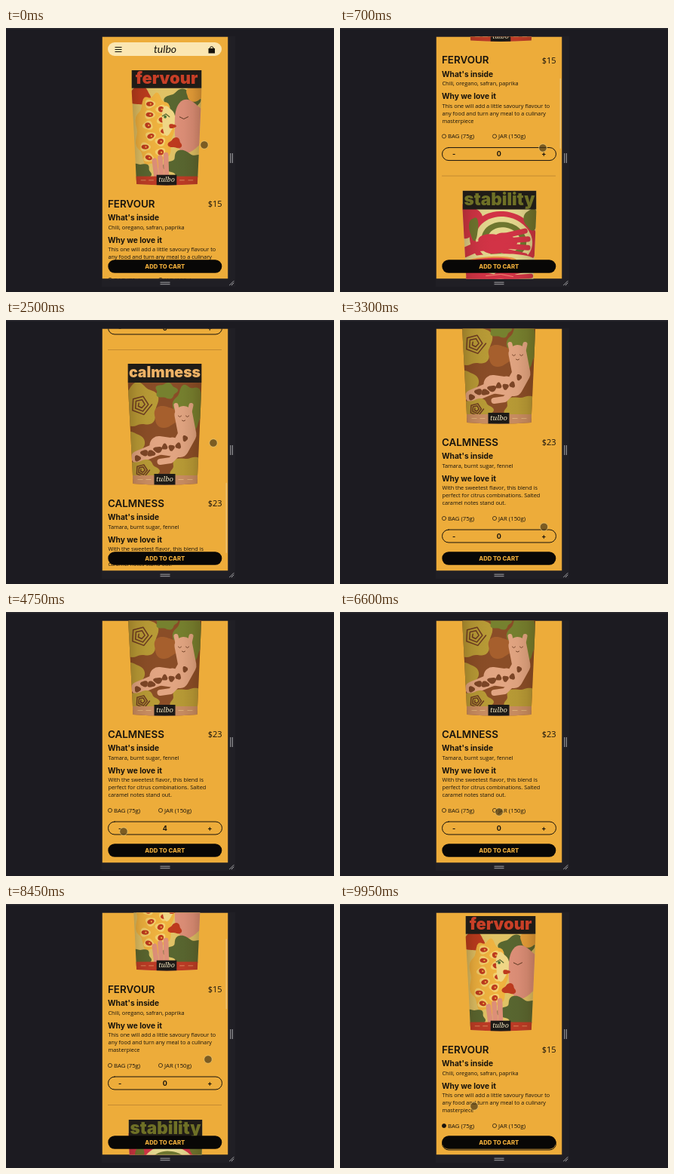
Animation of 435x350 px, one loop 10000 ms. Source, as an HTML page with a canvas:

```html
<!DOCTYPE html>
<html lang="en">
<head>
<meta charset="utf-8">
<title>Spice shop</title>
<style>
html, body { margin: 0; width: 100%; height: 100%; overflow: hidden; background: #1c1b21; }
canvas { display: block; width: 435px; height: 350px; }
</style>
</head>
<body>
<canvas id="stage"></canvas>
<script>
const LOOP = 10000, ORANGE = '#edac3a', INK = '#17130d', GREY = '#a5a5a8', BRAND = 'tulbo';
const HEAD = 'Inter, sans-serif', BODY = '"Open Sans", sans-serif';
const VIEW = { x: 127.5, y: 11.5, w: 167, h: 321 };
const FIRST = 233, PITCH = 357, LAST_SCROLL = 785;
const BAG_CLICK = 9450, JAR_CLICK = 6850;
const canvas = document.getElementById('stage'), c = canvas.getContext('2d');
const dpr = window.devicePixelRatio || 1;
canvas.width = 435 * dpr;
canvas.height = 350 * dpr;

// ---- motion ----
const clamp = (v, lo, hi) => Math.min(hi, Math.max(lo, v));
const steps = (t, from, every) => clamp(Math.floor((t - from) / every), 0, 5);

function ease(t, from, to) {
  const p = clamp((t - from) / (to - from), 0, 1);
  return p * p * (3 - 2 * p);
}

// Each leg eases from wherever the previous one ended: [from, to, value]
const travel = (t, start, legs) => legs.reduce((v, [a, b, end]) => v + (end - v) * ease(t, a, b), start);

const scrollAt = t => travel(t, 0, [[200, 1150, 352], [1800, 2480, 704], [2600, 3000, LAST_SCROLL],
  [7250, 8400, 120], [8700, 9200, 40]]);

const cursorLegs = [[200, 1200, 275, 163], [2900, 3400, 270, 287], [4300, 4600, 156, 291],
  [5900, 6600, 211, 265], [7100, 7400, 268, 206], [8700, 9300, 138, 293], [9650, 9950, 178, 268]];
const cursorAt = t => [263, 155].map((v, k) => travel(t, v, cursorLegs.map(l => [l[0], l[1], l[2 + k]])));

const countAt = t => steps(t, 3300, 150) - steps(t, 4400, 250);

// ---- drawing helpers ----
const rand = n => Math.abs(Math.sin(n * 127.1 + 3.7) * 43758.5) % 1;

function rect(col, x, y, w, h) {
  c.fillStyle = col;
  c.fillRect(x, y, w, h);
}

function text(s, x, y, font, col = INK, align = 'left') {
  c.font = font;
  c.fillStyle = col;
  c.textAlign = align;
  c.fillText(s, x, y);
}

function pill(x, y, w, h, fill, stroke) {
  c.beginPath();
  c.roundRect(x, y, w, h, h / 2);
  if (fill) { c.fillStyle = fill; c.fill(); }
  if (stroke) { c.strokeStyle = stroke; c.lineWidth = 1; c.stroke(); }
}

function line(col, width, ...points) {
  c.beginPath();
  points.forEach(p => c.lineTo(...p));
  c.strokeStyle = col;
  c.lineWidth = width;
  c.lineCap = c.lineJoin = 'round';
  c.stroke();
}

function circle(x, y, r, fill, stroke, width = 1) {
  c.beginPath();
  c.arc(x, y, r, 0, 7);
  if (fill) { c.fillStyle = fill; c.fill(); }
  if (stroke) { c.strokeStyle = stroke; c.lineWidth = width; c.stroke(); }
}

// Ellipse with a wavy rim
function patch(col, x, y, rx, ry, lobes = 3, depth = .12) {
  c.beginPath();
  for (let a = 0; a < 6.28; a += .1) {
    const k = 1 + depth * Math.sin(lobes * a + x);
    c.lineTo(x + rx * k * Math.cos(a), y + ry * k * Math.sin(a));
  }
  c.fillStyle = col;
  c.fill();
}

function spiral(col, x, y, r) {
  const ring = [...Array(14).keys()].map(i => {
    const a = i * 1.2566, k = r * (1 - i / 16);
    return [x + k * Math.cos(a), y + k * Math.sin(a)];
  });
  line(col, 1.5, ...ring);
}

// Palm with four fanned fingers pointing to one side
function hand(col, x, y, size, side) {
  patch(col, x, y, size * .6, size * .3);
  for (let i = 0; i < 4; i++) {
    const a = (i - 1.5) * .3;
    line(col, size * .17, [x, y + (i - 1.5) * size * .12],
      [x + side * size * Math.cos(a), y + size * .9 * Math.sin(a)]);
  }
}

// ---- bag art, centred on x = 0, with y from 25 to 160 ----
function pizzaArt() {
  const green = '#586630', pink = '#dd8f78', red = '#bd3a1e';
  patch(red, -38, 36, 16, 13);
  patch(green, 22, 46, 24, 18, 5);
  patch('#e8a03a', 40, 33, 13, 10);
  patch('#efb23f', -17, 84, 26, 50, 9, .07);
  for (let i = 0; i < 11; i++) {
    const x = -30 + i % 2 * 19 + rand(i) * 8, y = 47 + i * 7.5;
    patch('#f3cf6c', x, y, 7, 6);
    patch(red, x, y, 4.6, 3.6, 2);
    circle(x + 1, y, 1.2, '#efb23f');
  }
  patch('#efd685', 2, 70, 9, 20);
  patch(pink, 33, 78, 24, 36, 3, .1);
  line(green, 1.3, [-6, 64], [-1, 61], [4, 65]);
  circle(-2, 65, 2, '#477032');
  line('#58351f', 1, [18, 65], [24, 68], [30, 65]);
  patch(red, 8, 78, 5, 3);
  patch(red, 12, 102, 9, 7, 3, .2);
  patch(green, 30, 134, 30, 20, 5, .2);
  patch(green, -38, 142, 16, 12, 5);
  for (let i = 0; i < 3; i++) line(pink, 7, [-14 + i * 7, 150], [-17 + i * 8, 126 - i * 4]);
}

function handsArt() {
  const red = '#d23346', olive = '#6e762f', cream = '#e4d78e';
  patch(red, -42, 40, 18, 22);
  [red, cream, olive, cream, red].forEach((col, i) => patch(col, 6, 66, 46 - i * 8, 38 - i * 7, 2, .05));
  patch(olive, -34, 50, 6, 15);
  patch(olive, 42, 38, 9, 14);
  hand(red, -4, 70, 42, 1);
  line(red, 13, [-46, 82], [-28, 74], [0, 72]);
  patch(cream, -4, 93, 46, 10, 2);
  patch('#eb9a42', -10, 93, 30, 6, 2);
  patch(red, -10, 93, 25, 4, 2);
  patch(red, -38, 112, 20, 12);
  hand(red, -4, 122, 38, -1);
  hand(red, 6, 118, 36, 1);
  for (let i = 0; i < 3; i++) line('#ee8a72', 1, [-18, 113 + i * 6], [2, 111 + i * 6], [18, 114 + i * 6]);
  patch(olive, 38, 142, 14, 13, 5);
  patch(red, -34, 148, 16, 7);
}

function catArt() {
  const pink = '#e2a582', yellow = '#b89b36', green = '#76812f', dark = '#6b3a22';
  patch(yellow, -34, 55, 25, 28, 5, .1);
  spiral(dark, -32, 54, 15);
  patch(green, 2, 36, 14, 10, 5);
  patch(green, 32, 58, 20, 29, 6, .1);
  patch('#a65f2d', 2, 70, 17, 14);
  patch(yellow, -42, 106, 14, 16);
  patch(yellow, 32, 140, 24, 16, 5);
  line(pink, 24, [25, 68], [30, 94], [20, 112], [-8, 108]);
  line(pink, 17, [10, 106], [-12, 114], [-36, 124]);
  line(pink, 8, [24, 112], [8, 128], [-6, 130]);
  for (const side of [-1, 1]) {
    line(pink, 6, [25 + side * 8, 64], [25 + side * 10, 55]);
    line(dark, .9, [23 + side * 5, 69], [25 + side * 5, 70.5], [27 + side * 5, 69]);
  }
  line(dark, .9, [23, 75], [25, 76], [27, 75]);
  for (let i = 0; i < 8; i++) patch('#7c4526', -36 + i * 9, 122 - i * 3 + rand(i) * 10 - 5, 3 + rand(i + 9) * 3, 4);
  patch(yellow, -30, 142, 21, 14, 5);
  spiral(dark, -30, 141, 10);
}

const products = [
  { name: 'FERVOUR', price: '$15', inside: 'Chili, oregano, safran, paprika',
    why: ['This one will add a little savoury flavour to', 'any food and turn any meal to a culinary', 'masterpiece'],
    bag: { x: 213, top: -177, scale: .95, size: 23, base: '#e0c265', ink: '#c83f27', band: '#bd3b26', art: pizzaArt } },
  { name: 'STABILITY', price: '$20', inside: 'Gorgonzola cheese, tomato, parsley',
    why: ['This one was made especially for fish.', 'Offers a complex variety of flavour with', 'every single bite.'],
    bag: { x: 211.5, top: -184, scale: 1, size: 22.5, base: '#e4d78e', ink: '#6e7026', band: '#646b2b', art: handsArt } },
  { name: 'CALMNESS', price: '$23', inside: 'Tamara, burnt sugar, fennel',
    why: ['With the sweetest flavor, this blend is', 'perfect for citrus combinations. Salted', 'caramel notes stand out.'],
    bag: { x: 210.5, top: -185, scale: 1, size: 19.5, base: '#8a4d27', ink: '#eeb266', band: '#c98d62', art: catArt } }
];

function drawBag(b, name) {
  const w = 49, h = 160, bar = 25;
  c.save();
  c.translate(b.x, b.top);
  c.scale(b.scale, b.scale);
  c.beginPath();
  c.moveTo(-w, 0);
  c.lineTo(w, 0);
  c.lineTo(w, bar);
  c.quadraticCurveTo(w - 3, h * .6, w - 6, h - 1);
  c.quadraticCurveTo(0, h + 2, 7 - w, h - 1);
  c.quadraticCurveTo(4 - w, h * .6, -w, bar);
  c.clip();
  rect(b.base, -w, 0, 2 * w, h + 2);
  b.art();
  rect(b.band, -w, h - 12, 2 * w, 14);
  for (const x of [-36, -25, 18, 30]) rect('rgba(250,220,150,.5)', x, h - 7, 7, 1);
  const shade = c.createLinearGradient(-w, 0, w, 0);
  for (let i = 0; i <= 8; i++) shade.addColorStop(i / 8, `rgba(60,30,0,${.25 * Math.abs(i / 4 - 1) ** 3})`);
  rect(shade, -w, bar, 2 * w, h);
  rect('#201c17', -w, 0, 2 * w, bar);
  text(name.toLowerCase(), 0, bar / 2 + b.size * .3, `900 ${b.size}px ${HEAD}`, b.ink, 'center');
  rect('#1d1a17', -14, h - 14, 28, 16);
  text(BRAND, 0, h - 4, 'italic 9.5px "Noto Serif", serif', '#f1e4bd', 'center');
  c.restore();
}

function radio(x, label, on) {
  circle(x, 101, 2.6, on && INK, INK, .7);
  text(label, x + 5, 103.5, `7.8px ${BODY}`);
}

function drawProduct(p, i, t) {
  c.save();
  c.translate(0, FIRST + PITCH * i);
  drawBag(p.bag, p.name);
  text(p.name, 135, 4.5, `600 13.4px ${HEAD}`);
  text(p.price, 286.5, 4.3, `11px ${BODY}`, INK, 'right');
  text("What's inside", 135, 22, `700 10.2px ${HEAD}`);
  text(p.inside, 135.5, 33.5, `7.3px ${BODY}`);
  text('Why we love it', 135, 51.5, `700 10.2px ${HEAD}`);
  p.why.forEach((s, n) => text(s, 135.5, 63 + n * 10, `7.3px ${BODY}`));
  radio(138, 'BAG (75g)', i === 0 && t >= BAG_CLICK);
  radio(205, 'JAR (150g)', i === 2 && t >= JAR_CLICK);
  pill(135.5, 116, 151, 17, null, INK);
  ['-', i === 2 ? countAt(t) : 0, '+'].forEach((s, n) =>
    text(s, 151 + n * 59.7, 127.5, `700 9px ${HEAD}`, INK, 'center'));
  if (i < 2) rect('#c58b31', 135, 153, 151, 1);
  c.restore();
}

function drawHeader() {
  pill(135, 19, 151, 18, '#fbe6b2');
  for (const y of [25, 28, 31]) rect(INK, 144.5, y, 9, 1);
  text(BRAND, 211, 33, 'italic 14px Lato, sans-serif', INK, 'center');
  circle(272.7, 27, 2.3, null, INK);
  rect(INK, 268.5, 27, 8.5, 6.5);
}

function drawFrame() {
  rect('#1c1b21', 0, 0, 435, 350);
  rect('#2a292f', 0, 0, 435, 1.5);
  rect('#201f25', 127, 11, 177, 332);
  for (const d of [0, 2.5]) {
    rect(GREY, 297.3 + d, 166, 1, 13);
    rect(GREY, 204.5, 336.7 + d, 13, 1);
    line(GREY, 1, [296.5 + d, 341], [302, 335.5 + d]);
  }
}

function draw(t) {
  const scroll = scrollAt(t);
  c.setTransform(dpr, 0, 0, dpr, 0, 0);
  drawFrame();
  c.save();
  c.beginPath();
  c.rect(VIEW.x, VIEW.y, VIEW.w, VIEW.h);
  c.clip();
  rect(ORANGE, VIEW.x, VIEW.y, VIEW.w, VIEW.h);
  c.save();
  c.translate(0, -scroll);
  drawHeader();
  products.forEach((p, i) => drawProduct(p, i, t));
  c.restore();
  pill(135.3, 307.3, 151, 17.5, '#080706');
  text('ADD TO CART', 210.7, 318.8, `800 7.7px ${HEAD}`, ORANGE, 'center');
  // The scrollbar shows only during and just after a scroll
  if (scroll !== scrollAt(t - 200)) {
    const k = VIEW.h / (LAST_SCROLL + VIEW.h);
    pill(291.5, VIEW.y + scroll * k, 1.6, VIEW.h * k, 'rgba(235,205,150,.6)');
  }
  c.restore();
  circle(...cursorAt(t), 5.3, 'rgba(75,58,24,.7)', 'rgba(240,205,120,.7)');
}

const start = performance.now();
function tick() {
  draw((performance.now() - start) % LOOP);
  requestAnimationFrame(tick);
}
tick();
</script>
</body>
</html>
```
